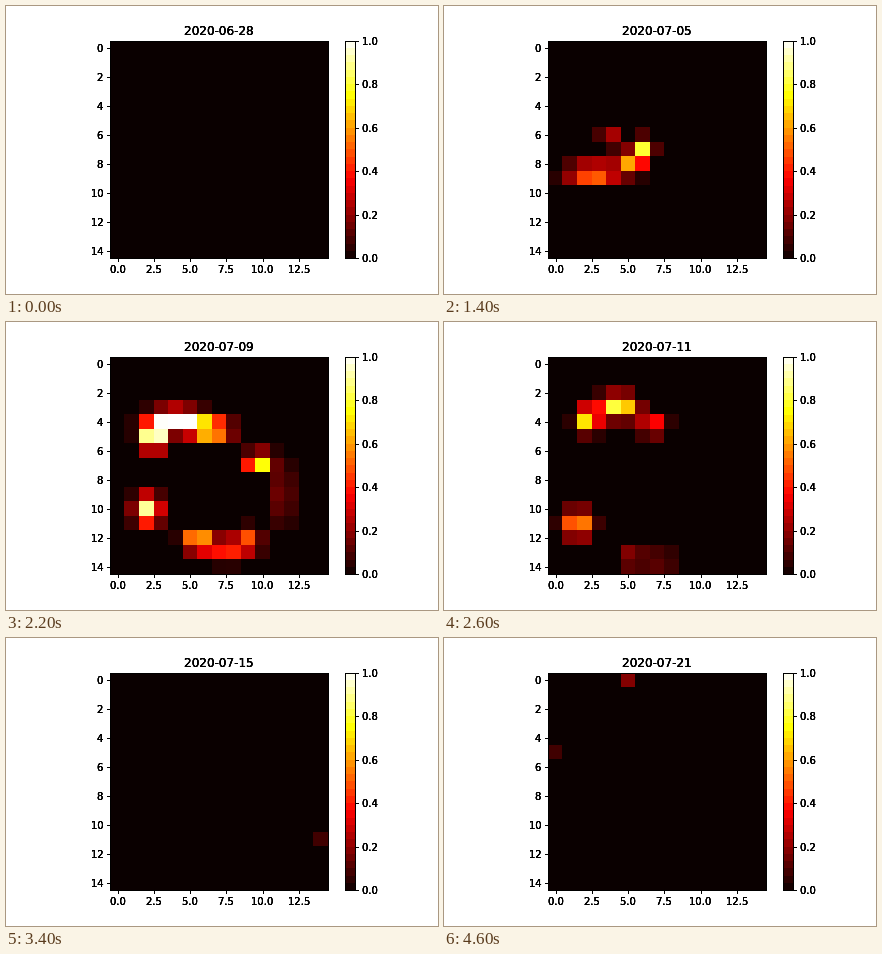
These frames come from a looping animation (432x288 px, 5.6 s). An HTML page with a canvas:

```html
<!DOCTYPE html>
<html lang="en">
<head>
<meta charset="utf-8">
<title>Daily heat map</title>
<style>
html, body { margin: 0; width: 432px; height: 288px; overflow: hidden; background: #fff; }
canvas { display: block; }
</style>
</head>
<body>
<canvas id="stage" width="432" height="288"></canvas>
<script>
const ctx = document.getElementById('stage').getContext('2d');
const LOOP = 5600, STEP = 200, LAST = 23, N = 15;
const LEFT = 104.4, TOP = 34.56, SIZE = 217.44, CELL = SIZE / N, BOTTOM = TOP + SIZE;
const BAR_X = 338.58, BAR_W = 10.872, BANDS = 30, FLOOR = 0.04;

// Drifting clouds, one path each: [day, x, y, x radius, y radius, strength].
const head = [
  [1, 1, 7.5, 0.7, 0.7, 0.5], [4, 4, 7, 0.7, 0.7, 0.74], [7, 6, 7, 0.7, 0.7, 0.76],
  [11, 9.7, 6.8, 0.8, 0.65, 0.95], [12, 10, 7, 0.6, 0.6, 0], [14, 12, 7, 0.6, 0.6, 0],
  [15, 12, 7, 0.8, 0.5, 0.1], [17, 14, 7, 0.6, 0.5, 0]
];
const tail = [
  [1, 0, 8, 0.8, 0.7, 0.3], [4, 2, 8.1, 1.54, 0.7, 0.48], [7, 2.6, 8.7, 1.65, 0.75, 0.62],
  [11, 2.1, 10.1, 0.85, 1, 0.92], [15, 1, 12, 1.1, 0.9, 0.42], [17, 0, 13, 1, 0.9, 0]
];
const core = [
  [2, 3, 8, 0.7, 0.7, 0], [4, 4, 8, 0.8, 0.7, 0.36], [7, 5.2, 8, 0.9, 0.7, 0.6],
  [11, 5.5, 12.2, 0.9, 0.7, 0.75], [14, 5, 14, 0.9, 0.7, 0]
];
const crest = [
  [4, 3, 7, 0.7, 0.7, 0], [7, 3.8, 6.1, 0.8, 0.8, 0.25], [11, 4, 3.9, 1.6, 0.7, 1.3],
  [15, 4.7, 2, 0.9, 0.9, 0.45], [17, 4.7, 0.6, 0.9, 0.8, 0]
];
const west = [
  [7, 3.5, 6.5, 0.7, 0.7, 0], [11, 2.5, 5.1, 0.8, 0.8, 1.3],
  [15, 2, 2.6, 0.7, 0.9, 0.32], [17, 2, 1, 0.7, 0.8, 0]
];
const north = [
  [7, 5.5, 7, 0.8, 0.8, 0], [11, 6.4, 4.6, 1.3, 0.8, 0.85],
  [15, 7, 4, 0.5, 0.5, 0.15], [16, 7, 4, 0.5, 0.5, 0]
];
const south = [
  [7, 6, 9, 1, 0.8, 0], [11, 7.6, 12.8, 1.7, 0.8, 0.45], [14, 7, 14, 1, 0.8, 0]
];
const corner = [
  [8, 7, 9, 0.8, 0.7, 0], [11, 9, 12, 0.8, 0.7, 0.4], [12, 9, 13, 0.6, 0.7, 0]
];
const east = [
  [8, 8, 8, 0.7, 1, 0], [11, 11.4, 9, 0.7, 2.3, 0.2], [12, 12, 9, 0.7, 2, 0]
];
const CLOUDS = [head, tail, core, crest, west, north, south, corner, east];

// Single-cell, single-day sparks: [day, x, y, strength].
const SPARKS = [
  [17, 14, 11, 0.08], [19, 4, 1, 0.08], [19, 5, 1, 0.15], [19, 3, 5, 0.08],
  [20, 0, 11, 0.08], [23, 5, 0, 0.18], [23, 0, 5, 0.08]
];

function along(path, day) {
  const i = path.findIndex((key, k) => k > 0 && day >= path[k - 1][0] && day <= key[0]);
  if (i < 0) return null;
  const a = path[i - 1], b = path[i], p = (day - a[0]) / (b[0] - a[0]);
  return a.map((v, k) => v + (b[k] - v) * p);
}

function heat(clouds, day, x, y) {
  let sum = 0;
  for (const [, cx, cy, rx, ry, strength] of clouds) {
    sum += strength * Math.exp(-(((x - cx) / rx) ** 2) - ((y - cy) / ry) ** 2);
  }
  for (const [d, sx, sy, strength] of SPARKS) {
    if (d === day && sx === x && sy === y) sum += strength;
  }
  return sum < FLOOR ? 0 : Math.min(1, sum);
}

// Black, red, yellow, white ramp.
function hot(v) {
  const ramp = (a, b) => Math.max(0, Math.min(1, (v - a) / (b - a)));
  const r = 0.0416 + 0.9584 * ramp(0, 0.365);
  return `rgb(${[r, ramp(0.365, 0.746), ramp(0.746, 1)].map(c => Math.floor(c * 255))})`;
}

const snap = v => Math.floor(v + 0.5) + 0.5;

function line(x1, y1, x2, y2) {
  ctx.beginPath();
  ctx.moveTo(x1, y1);
  ctx.lineTo(x2, y2);
  ctx.stroke();
}

function frame(x, y, w, h) {
  ctx.strokeRect(snap(x), snap(y), snap(x + w) - snap(x), snap(y + h) - snap(y));
}

// align: 0 left, 0.5 centre, 1 right
function label(text, x, y, align, size = 10) {
  ctx.font = `${size}px "DejaVu Sans", sans-serif`;
  ctx.fillStyle = '#000';
  const left = Math.round(x - ctx.measureText(text).width * align);
  // Repeated passes harden the soft glyph edges.
  for (let pass = 0; pass < 4; pass++) ctx.fillText(text, left, y);
}

function drawCells(day) {
  const clouds = CLOUDS.map(path => along(path, day)).filter(Boolean);
  const edgeX = k => Math.round(103.96 + 14.53 * k);
  const edgeY = k => Math.round(34.5 + CELL * k);
  for (let y = 0; y < N; y++) {
    for (let x = 0; x < N; x++) {
      ctx.fillStyle = hot(heat(clouds, day, x, y));
      ctx.fillRect(edgeX(x), edgeY(y), edgeX(x + 1) - edgeX(x), edgeY(y + 1) - edgeY(y));
    }
  }
}

function drawAxes() {
  frame(LEFT, TOP, SIZE, SIZE);
  for (let v = 0; v < N; v += 2.5) {
    const x = LEFT + (v + 0.5) * CELL;
    line(snap(x), 252.5, snap(x), 256);
    label(v.toFixed(1), x, 267, 0.5);
  }
  for (let v = 0; v < N; v += 2) {
    const y = TOP + (v + 0.5) * CELL;
    line(101, snap(y), 104.5, snap(y));
    label(String(v), LEFT - 7, Math.round(y + 4), 1);
  }
}

function drawBar() {
  for (let i = 0; i < BANDS; i++) {
    const top = Math.round(BOTTOM - (i + 1) * SIZE / BANDS);
    const end = Math.round(BOTTOM - i * SIZE / BANDS);
    ctx.fillStyle = hot((i + 0.5) / BANDS);
    ctx.fillRect(339, top, 11, end - top);
  }
  frame(BAR_X, TOP, BAR_W, SIZE);
  for (let i = 0; i <= 5; i++) {
    const y = BOTTOM - SIZE * i / 5;
    line(349.5, snap(y), 353, snap(y));
    label((i / 5).toFixed(1), BAR_X + BAR_W + 7, Math.round(y + 4), 0);
  }
}

function draw(day) {
  ctx.fillStyle = '#fff';
  ctx.fillRect(0, 0, 432, 288);
  ctx.strokeStyle = '#000';
  ctx.lineWidth = 1;
  drawCells(day);
  drawAxes();
  drawBar();
  const date = new Date(Date.UTC(2020, 5, 28 + day)).toISOString().slice(0, 10);
  label(date, LEFT + SIZE / 2, 29, 0.5, 12);
}

function tick() {
  const t = performance.now() % LOOP;
  draw(Math.min(LAST, Math.floor(t / STEP)));
  requestAnimationFrame(tick);
}
tick();
</script>
</body>
</html>
```
